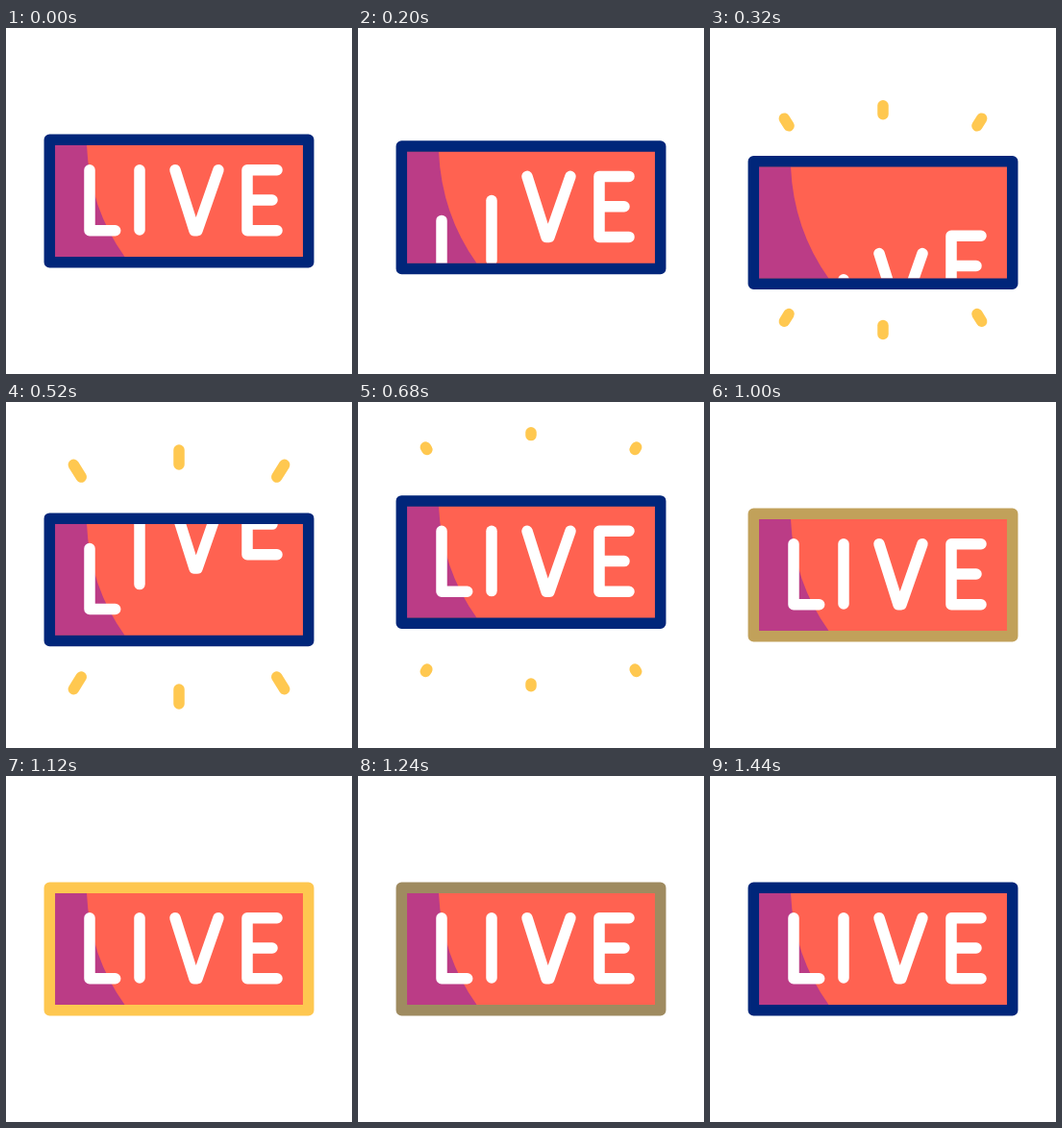
An HTML page that plays this animation: 360x360 px, repeating every 1.48 s.

```html
<!DOCTYPE html>
<html lang="en">
<head>
<meta charset="utf-8">
<title>Live sign</title>
<style>
  html, body { margin: 0; height: 100%; overflow: hidden; background: #fff; }
  svg { display: block; width: 100vw; height: 100vh; }
  g { fill: none; stroke-width: 11.5; stroke-linecap: round; stroke-linejoin: round; }
</style>
</head>
<body>
<svg viewBox="0 0 360 360" role="img" aria-label="LIVE">
  <clipPath id="panel"><rect x="51" y="122" width="258" height="116"/></clipPath>
  <g id="rays" stroke="#ffc850"></g>
  <g id="sign">
    <rect x="45" y="116" width="270" height="128" fill="#ff6251" stroke="none"/>
    <path d="M45 122H84Q87 187 123.500 238H45Z" fill="#bb3c86"/>
    <g clip-path="url(#panel)" stroke="#fff">
      <path class="letter" d="M87 147.700V210.700H113.700"/>
      <path class="letter" d="M139 147.700V210"/>
      <path class="letter" d="M176 147.700L196 210.700H199L221 147.700"/>
      <path class="letter" d="M282 147.700H251V210.700H282M251 179H277"/>
    </g>
    <rect id="frame" x="45.300" y="116.300" width="269.400" height="127.400"/>
  </g>
</svg>
<script>
const LOOP = 1480;
const NAVY = [0, 38, 122], GOLD = [255, 200, 80];
const $ = id => document.getElementById(id);
const letters = document.querySelectorAll('.letter');

const clamp = u => Math.min(1, Math.max(0, u));
const progress = (t, start, end) => clamp((t - start) / (end - start));
const smooth = u => u * u * (3 - 2 * u);
const easeIn = u => u * u;
const easeOut = u => 1 - (1 - u) ** 2;
const slowMiddle = u => u + 1.2 * u * (1 - u) * (0.5 - u);

const rays = [];
for (const side of [-1, 0, 1]) for (const up of [-1, 1]) {
  const path = document.createElementNS('http://www.w3.org/2000/svg', 'path');
  $('rays').append(path);
  rays.push({ path, side, up });
}

function rayPoint({ side, up }, d) {
  const x = side * (98 + 0.53 * (d - 110));
  const y = side ? 98 + 0.85 * (d - 110) : d;
  return `${180 + x} ${177.2 + up * y}`;
}

const shift = (el, y) => el.setAttribute('transform', `translate(0 ${y})`);

// Dip, rebound above the rest position, settle
function signY(t) {
  return 23.5 * smooth(progress(t, 120, 350))
    - 37 * smooth(progress(t, 350, 690))
    + 13.5 * smooth(progress(t, 690, 980));
}

// Drop out below, then come back in from above
function letterY(t) {
  return t < 200
    ? 100 * slowMiddle(progress(t, 10, 170))
    : 100 * slowMiddle(progress(t, 200, 400)) - 100;
}

function drawRays(t) {
  const inner = 109.5 + 22.5 * easeIn(progress(t, 260, 710));
  const outer = 109.5 + 22.5 * easeOut(progress(t, 260, 520));
  $('rays').style.display = t > 260 && t < 710 ? '' : 'none';
  for (const ray of rays)
    ray.path.setAttribute('d', `M${rayPoint(ray, inner)}L${rayPoint(ray, outer)}`);
}

function draw(t) {
  const y = signY(t);
  shift($('sign'), y);
  shift($('rays'), y);
  drawRays(t);
  letters.forEach((letter, i) => shift(letter, letterY(t - 120 - 40 * i)));

  const glow = Math.min(progress(t, 800, 1065), progress(t, 1440, 1120));
  const colour = NAVY.map((c, i) => Math.round(c + (GOLD[i] - c) * glow));
  $('frame').setAttribute('stroke', `rgb(${colour})`);
}

function tick() {
  draw(performance.now() % LOOP);
  requestAnimationFrame(tick);
}
tick();
</script>
</body>
</html>
```
